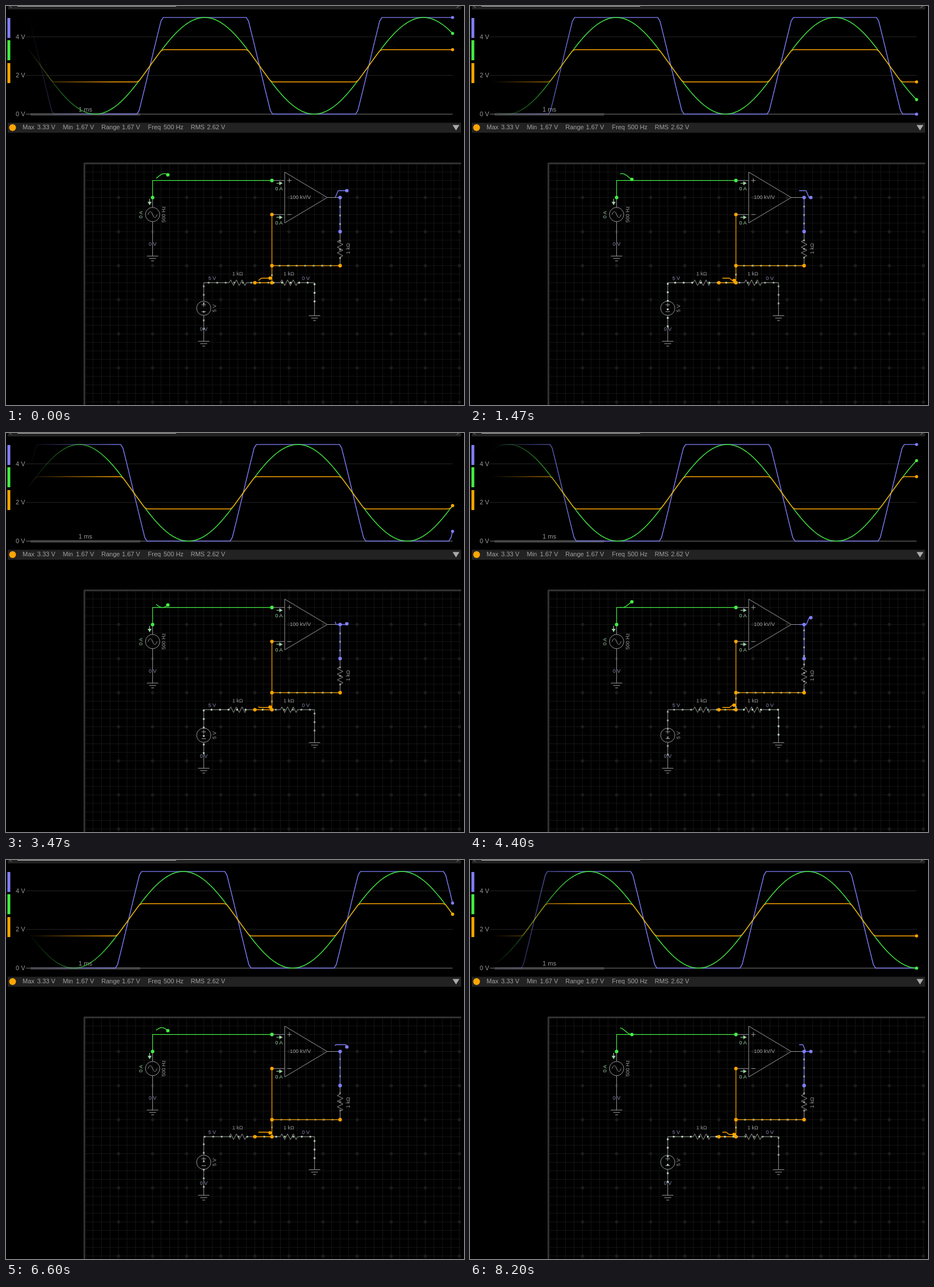
Recreate the animation shown at these times as an HTML page. Size 802 by 699 pixels, loop 8270 ms.

```html
<!DOCTYPE html>
<html lang="en">
<head>
<meta charset="utf-8">
<title>Op-amp circuit</title>
<style>
  html, body { margin: 0; width: 100%; height: 100%; overflow: hidden; background: #000; }
  svg { display: block; position: absolute; left: 0; top: 0; }
  text { font-family: "Liberation Sans", Arial, sans-serif; white-space: pre; }
</style>
</head>
<body>
<svg id="stage" width="802" height="699" viewBox="0 0 802 699"></svg>
<script>
const BLUE = '#8080ff', GREEN = '#44ee44', ORANGE = '#ffa500';
const GRAY = '#999', PALE = '#9fd0a6', VOLT = '#8888b0';
const LOOP = 8270, TAU = Math.PI * 2;
const stage = document.getElementById('stage');

function add(tag, attrs, parent = stage) {
  const el = document.createElementNS('http://www.w3.org/2000/svg', tag);
  for (const k in attrs) el.setAttribute(k, attrs[k]);
  parent.appendChild(el);
  return el;
}
const rect = (x, y, width, height, fill) => add('rect', { x, y, width, height, fill });
const dot = (cx, cy, r, fill) => add('circle', { cx, cy, r, fill });
const shape = (d, fill) => add('path', { d, fill });
const line = (d, stroke = GRAY, width = 1) =>
  add('path', { d, stroke, 'stroke-width': width, fill: 'none', 'stroke-linejoin': 'round' });
function label(str, x, y, { size = 9, fill = GRAY, anchor = 'middle', turn = false } = {}) {
  const attrs = { x, y, fill, 'font-size': size, 'text-anchor': anchor };
  if (turn) attrs.transform = `rotate(-90 ${x} ${y})`;
  add('text', attrs).textContent = str;
}

// Schematic grid
const UNIT = 14.925;
const gx = i => 137.3 + i * UNIT, gy = j => 275.8 + j * UNIT;
const toPath = pts => 'M' + pts.map(([i, j]) => gx(i) + ' ' + gy(j)).join('L');
const wire = (pts, color, width) => line(toPath(pts), color, width);

// ---- Scope panel ----
rect(3, 0, 794, 6, '#222');
rect(20, 0, 278, 1, '#bbb');
line('M6 0L10 3M793 0L789 3', '#888');
[[BLUE, 21], [GREEN, 60], [ORANGE, 100]].forEach(([c, y]) => rect(2.5, y, 5, 35, c));

const Y0 = 189.4, PER_VOLT = 33.86, X_START = 36, X_END = 782;
for (const v of [4, 2, 0]) {
  const y = Y0 - v * PER_VOLT;
  line(`M35 ${y}H${X_END}`, v ? '#262626' : '#444', v ? 1 : 2);
  label(v + ' V', 17, y + 3.8, { size: 11, anchor: 'start' });
}
line('M43 189.8H235', '#484848', 4);
label('1 ms', 139, 184.5, { size: 11 });

const defs = add('defs', {});
function fade(id, color) {
  const g = add('linearGradient', { id, gradientUnits: 'userSpaceOnUse', x1: 38, x2: 188, y1: 0, y2: 0 }, defs);
  add('stop', { offset: 0, 'stop-color': color, 'stop-opacity': 0 }, g);
  add('stop', { offset: 1, 'stop-color': color }, g);
  return `url(#${id})`;
}

// Voltages as functions of phase
const vIn = th => 2.5 + 2.5 * Math.cos(th);
const vOut = th => Math.max(0, Math.min(5, 3 * vIn(th) - 5));
const vMid = th => (5 + vOut(th)) / 3;

const signals = [
  { id: 'out', color: BLUE, fn: vOut, px: 596.8, py: gy(4) },
  { id: 'in', color: GREEN, fn: vIn, px: 283.4, py: gy(2) },
  { id: 'mid', color: ORANGE, fn: vMid, px: 462.4, py: gy(14) }
];
for (const s of signals) s.trace = line('', fade('fade-' + s.id, s.color), 1.4);
for (const s of signals) s.end = dot(X_END, 0, 2.7, s.color);

// ---- Measurement bar ----
rect(3, 204.5, 794, 17.5, '#222');
dot(11.5, 213, 6, ORANGE);
[['Max', 29], ['3.33 V', 54.5], ['Min', 99.5], ['1.67 V', 122.5], ['Range', 167], ['1.67 V', 203],
 ['Freq', 248.5], ['500 Hz', 276], ['RMS', 323.5], ['2.62 V', 352]]
  .forEach(([s, x]) => label(s, x, 216.3, { size: 11, anchor: 'start', fill: '#a0a0a0' }));
shape('M782 208.5H794L788 218Z', '#aaa');

// ---- Grid ----
let grid = '';
for (let i = 1; gx(i) < 797; i++) grid += `M${gx(i)} 277V699`;
for (let j = 1; gy(j) < 699; j++) grid += `M139 ${gy(j)}H797`;
line(grid, '#161616');
for (let i = 4; gx(i) < 797; i += 4)
  for (let j = 4; gy(j) < 699; j += 4) dot(gx(i), gy(j), 2.8, '#1c1c1c');
line(`M797 ${gy(0)}H${gx(0)}V699`, '#333', 3);

// ---- Components ----
function ground(i, j) {
  const x = gx(i), y = gy(j) + 13;
  line(`M${x} ${y - 13}V${y}M${x - 10} ${y}h20M${x - 6} ${y + 4.3}h12M${x - 2.5} ${y + 8.5}h5`);
}
function resistor(i, j, down) {
  const step = UNIT / 6, pts = [[0, 0], [UNIT, 0]];
  for (let k = 0; k < 6; k++) pts.push([UNIT + (2 * k + 1) * step, k % 2 ? 5 : -5]);
  pts.push([3 * UNIT, 0], [4 * UNIT, 0]);
  line('M' + pts.map(([a, b]) => down ? `${gx(i) + b} ${gy(j) + a}` : `${gx(i) + a} ${gy(j) + b}`).join('L'));
}
function arrow(x, y, turn) {
  add('path', { d: 'M-5 -.6H0V-3.5L6 0L0 3.5V.6H-5Z', fill: PALE, transform: `translate(${x} ${y}) rotate(${turn})` });
}

// sine source
const sx = gx(8), sy = gy(6);
line(`M${sx} ${gy(4)}V${sy - 12.5}M${sx} ${sy + 12.5}V${gy(10)}`);
add('circle', { cx: sx, cy: sy, r: 12.5, fill: 'none', stroke: GRAY });
line(`M${sx - 8} ${sy}C${sx - 5} ${sy - 7} ${sx - 3} ${sy - 7} ${sx} ${sy}S${sx + 5} ${sy + 7} ${sx + 8} ${sy}`);
ground(8, 10);
arrow(251.5, 343, 90);
label('0 A', 239.3, 365.5, { fill: PALE, turn: true });
label('500 Hz', 279, 365, { turn: true });
label('0 V', sx, 419.7, { fill: VOLT });

// amplifier
line('M488 291L562.5 335.5L488 380Z');
line(`M${gx(22)} ${gy(2)}H488M${gx(22)} ${gy(6)}H488M562.5 ${gy(4)}H${gx(30)}`);
line(`M492.5 ${gy(2)}h7.5M496.2 ${gy(2) - 3.8}v7.6M492.5 ${gy(6)}h7.5`);
label('100 kV/V', 515.5, 338.3, { fill: '#aaa' });
[310.5, 370.2].forEach(y => {
  arrow(478.5, y, 0);
  label('0 A', 478, y + 12.8, { fill: PALE });
});

// resistors and supply
resistor(30, 8, true);
resistor(16, 14);
resistor(22, 14);
label('1 kΩ', 602.3, 425, { turn: true });
label('1 kΩ', 405.7, 472.2);
label('1 kΩ', 495.3, 472.2);
label('5 V', 361, 479.5, { fill: VOLT });
label('0 V', 525, 479.5, { fill: VOLT });
wire([[16, 14], [14, 14], [14, 16]]);
const bx = gx(14), by = gy(17);
line(`M${bx} ${gy(16)}V${by - 12.5}M${bx} ${by + 12.5}V${gy(20)}`);
add('circle', { cx: bx, cy: by, r: 12.5, fill: 'none', stroke: GRAY });
line(`M${bx - 3.8} ${by - 6}h7.6M${bx} ${by - 9.8}v7.6M${bx - 3.8} ${by + 6}h7.6`);
label('5 V', 368.3, 529.5, { turn: true });
label('0 V', bx, 569.2, { fill: VOLT });
ground(14, 20);
wire([[26, 14], [27, 14], [27, 17]]);
ground(27, 17);

// coloured nets
wire([[8, 4], [8, 2], [22, 2]], GREEN, 1.2);
wire([[30, 4], [30, 8]], BLUE, 1.2);
wire([[22, 6], [22, 14]], ORANGE, 1.2);
wire([[22, 12], [30, 12]], ORANGE, 1.2);
wire([[20, 14], [22, 14]], ORANGE, 1.4);

// Currents: route, starting offset of the moving squares, milliamps
const flows = [
  { route: [[14, 20], [14, 14], [22, 14]], start: 8.6, amps: th => 5 - vMid(th) },
  { route: [[22, 14], [27, 14], [27, 17]], start: 2.8, amps: vMid },
  { route: [[30, 4], [30, 12], [22, 12], [22, 14]], start: 1.6, amps: th => 2 * vMid(th) - 5 }
];
for (const f of flows) f.el = shape('', '#c4e6c4');

[[8, 4, GREEN], [22, 2, GREEN], [30, 4, BLUE], [30, 8, BLUE], [22, 6, ORANGE], [22, 12, ORANGE],
 [30, 12, ORANGE], [22, 14, ORANGE], [20, 14, ORANGE]].forEach(([i, j, c]) => dot(gx(i), gy(j), 3.1, c));
for (const s of signals) {
  s.probe = line('', s.color, 1.3);
  s.tip = dot(s.px, 0, 3, s.color);
}

// ---- Motion ----
const PERIOD = 383, PX_RATE = TAU / PERIOD, PROBE_RATE = 2.8 / 20.5, DRIFT = 12.91;
const PHASE0 = 51 * PX_RATE;
const scroll = [[0, 0], [22, 92], [38, 159], [66, 280.7], [83, 350.7], [99, 420.7], [124, 526.8]];

function phaseAt(n) {
  let k = 1;
  while (scroll[k][0] < n) k++;
  const [a, p] = scroll[k - 1], [b, q] = scroll[k];
  return PHASE0 + (p + (q - p) * (n - a) / (b - a)) * PX_RATE;
}

// Polyline of a signal ending at x1 with phase th1, sampled on a fixed time step
function curve(fn, x0, x1, th1, rate, y0, scale) {
  const d = TAU / 100, th0 = th1 - (x1 - x0) * rate, pts = [];
  const put = th => pts.push((x1 - (th1 - th) / rate).toFixed(2) + ' ' + (y0 - fn(th) * scale).toFixed(2));
  put(th0);
  for (let k = Math.ceil(th0 / d); k * d < th1; k++) put(k * d);
  put(th1);
  return 'M' + pts.join('L');
}

function integrate(fn, a, b) {
  const steps = 400, h = (b - a) / steps;
  let sum = 0;
  for (let k = 0; k < steps; k++) sum += fn(a + (k + 0.5) * h);
  return sum * h;
}

function squares(route, offset) {
  let d = '';
  for (let k = 1; k < route.length; k++) {
    const [i, j] = route[k - 1], di = route[k][0] - i, dj = route[k][1] - j;
    const units = Math.abs(di + dj);
    for (let u = 0; u < units; u++) {
      const t = (u + offset / UNIT) / units;
      d += `M${(gx(i + di * t) - 1.5).toFixed(2)} ${(gy(j + dj * t) - 1.5).toFixed(2)}h3v3h-3Z`;
    }
  }
  return d;
}

function draw(n) {
  const th = phaseAt(n), probeScale = 2.4;
  for (const s of signals) {
    const v = s.fn(th);
    s.trace.setAttribute('d', curve(s.fn, X_START, X_END, th, PX_RATE, Y0, PER_VOLT));
    s.end.setAttribute('cy', Y0 - v * PER_VOLT);
    s.probe.setAttribute('d', curve(s.fn, s.px - 20.5, s.px, th, PROBE_RATE, s.py, probeScale));
    s.tip.setAttribute('cy', s.py - v * probeScale);
  }
  for (const f of flows) {
    const moved = f.start + DRIFT * integrate(f.amps, PHASE0, th);
    f.el.setAttribute('d', squares(f.route, (moved % UNIT + UNIT) % UNIT));
    f.el.setAttribute('fill-opacity', Math.min(1, 0.3 + 0.2 * Math.abs(f.amps(th))));
  }
}

// 15 pictures a second, switched on whole hundredths
const begin = performance.now();
let shown = -1;
function tick() {
  const t = Math.floor((performance.now() - begin) % LOOP / 10) * 10;
  const n = Math.min(123, Math.floor((t + 5) * 0.015));
  if (n !== shown) draw(shown = n);
  requestAnimationFrame(tick);
}
tick();
</script>
</body>
</html>
```
